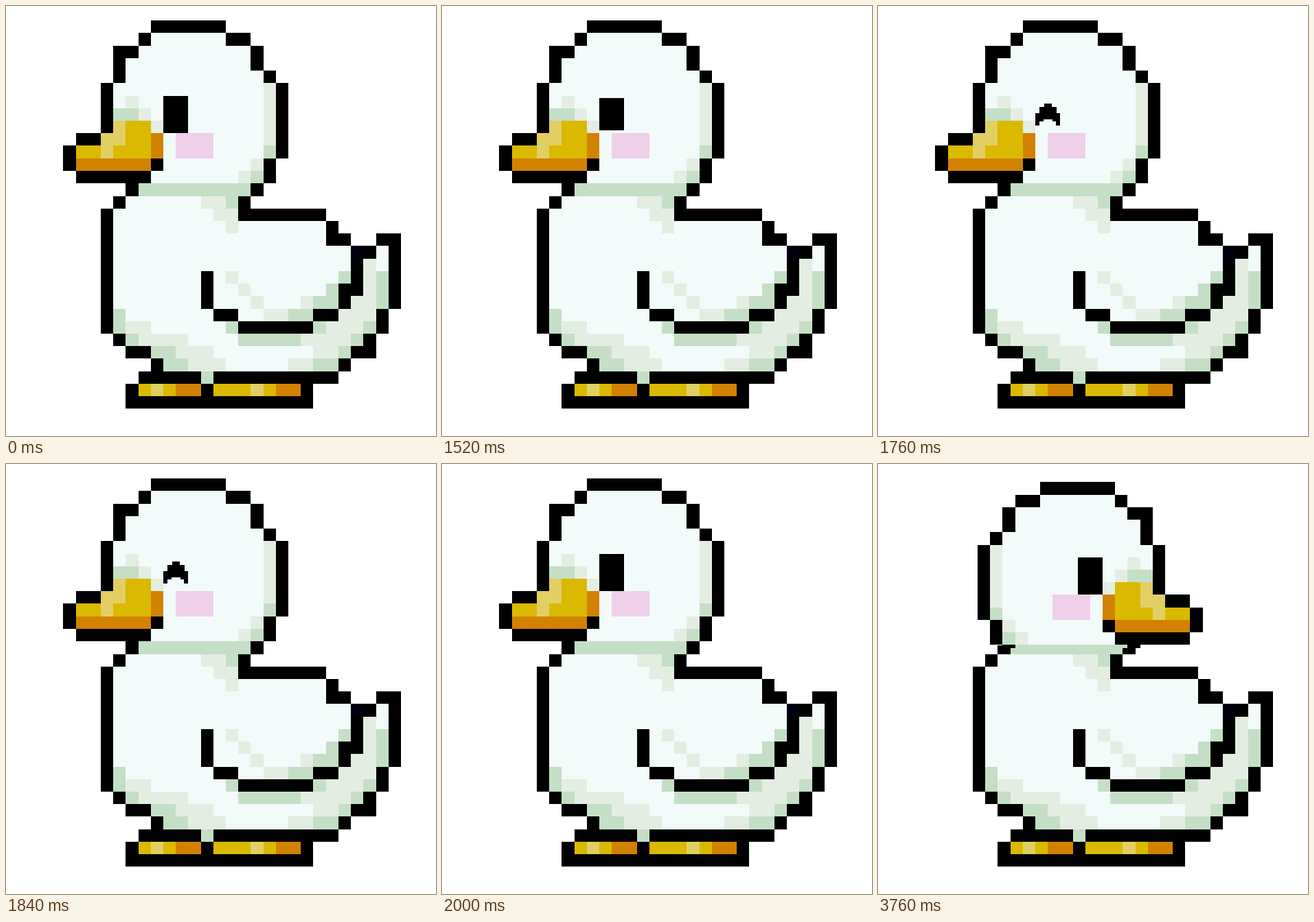
An HTML page that plays this animation: 626 by 626 pixels, repeating every 5.36 s.

```html
<!DOCTYPE html>
<html lang="en">
<head>
<meta charset="utf-8">
<title>Pixel duck</title>
<style>
html, body { margin: 0; width: 100%; height: 100%; overflow: hidden; background: #fff; }
svg { display: block; width: 626px; height: 626px; shape-rendering: crispEdges; }
.white { fill: #f2fafa; }
.light { fill: #e4ede1; }
.green { fill: #c4dfc6; }
.yellow { fill: #dab900; }
.straw { fill: #e1cf63; }
.orange { fill: #d28200; }
.pink { fill: #efcfea; }
</style>
</head>
<body>
<svg viewBox="0 0 626 626">
  <clipPath id="aboveNeck"><path d="M0 0H626V268H0z"/></clipPath>
  <g clip-path="url(#aboveNeck)">
    <g id="head">
      <g transform="translate(83.3 21.2) scale(18.21 18.22)">
        <path d="M7 0H13V1H15V2H16V4H17V5H18V11H17V13H16V14H5V13H1V12H0V10H1V9H3V5H4V2H6V1H7z"/>
        <path class="white" d="M7 1H13V2H15V4H16V5H17V11H16V13H7V12H8V9H4V5H5V3H6V2H7z"/>
        <path class="light" d="M5 6h1v1h-1zM6 7h1v1h-1zM7 8h1v1h-1zM16 5h1v5h-1zM15 11h1v1h-1zM14 12h1v1h-1z"/>
        <path class="green" d="M4 7h2v1h-2zM16 10h1v1h-1zM15 12h1v1h-1zM6 13h9v1h-9z"/>
        <path class="yellow" d="M5 8H7V11H1V10H4V8z"/>
        <path class="straw" d="M4 8H5V10H4V11H3V9H4z"/>
        <path class="orange" d="M1 11H7V12H1zM7 9H8V11H7z"/>
        <path class="pink" d="M9 9h3v2h-3z"/>
      </g>
      <path id="eye"/>
    </g>
  </g>
  <!-- The body overlaps the lower part of the neck. -->
  <g transform="translate(83.3 21.5) scale(18.21 18.22)">
    <path d="M5 13.3H6V13.53H16V14H15V15H21V16H22V17H23V18H25V17H27V23H26V25H25V27H23V28H22V29H20V31H5V29H6V28H7V27H5V26H4V25H3V15H4V14H5z"/>
    <path class="white" d="M5 14H14V16H21V18H23V19H25V18H26V23H25V25H24V26H23V27H22V28H8V27H7V26H5V25H4V15H5z"/>
    <path class="light" d="M11 14H13V15H14V17H13V16H12V15H11zM13 20h1v1h-1zM14 21h1v1h-1zM15 22h1v1h-1zM19 22h1v1h-1zM16 23h2v1h-2z"/>
    <path class="light" d="M24 19H25V24H24V25H23V26H22V27H20V28H18V27H20V26H19V25H21V24H22V23H23V22H24z"/>
    <path class="light" d="M5 24H7V25H10V26H12V27H13V28H10V27H9V26H7V25H5z"/>
    <path class="light" d="M6 25h1v1h-1z"/>
    <path class="green" d="M6 13.53H15V14H6zM13 14h1v1h-1zM22 20h1v1h-1zM21 21h1v2h-2v-1h1zM18 23h2v1h-2zM20 24h1v1h-1zM13 24h1v1h-1zM14 25h5v1h-5z"/>
    <path class="green" d="M25 20H26V23H25zM24 24H25V25H24V26H23V27H22V28H20V27H22V26H23V25H24z"/>
    <path class="green" d="M4 23H5V25H6V26H9V27H10V28H8V27H7V26H5V25H4zM11 28h1v1h-1z"/>
    <path d="M23 19H24V22H23V23H22V21H23zM11 20h1v3h-1zM12 23H14V24H20V23H22V24H20V25H14V24H12z"/>
    <path fill="#000010" d="M23 18h1v1h-1z"/>
    <path class="yellow" d="M6 29h3v1h-3zM12 29h5v1h-5z"/>
    <path class="straw" d="M7 29h1v1h-1zM15 29h1v1h-1z"/>
    <path class="orange" d="M9 29h2v1h-2zM17 29h2v1h-2z"/>
  </g>
</svg>
<script>
const LOOP = 5360, TURN = 3760;
const eyes = {
  open: "M229 131H265V185H229z",
  half: "M229 134H265V181H229z",
  squint: "M234 142H261V149H265V174H257V170H238V174H229V149H234z",
  shut: "M242 142H253V147H260V156H265V174H259V168H254V165H241V168H235V174H229V156H235V147H242z"
};
const blink = [[0, "open"], [1520, "half"], [1600, "squint"], [1760, "shut"], [1920, "squint"], [2000, "open"]];
const head = document.getElementById("head");
const eye = document.getElementById("eye");

function draw(now) {
  const t = now % LOOP;
  const [, pose] = blink.findLast(([start]) => start <= t);
  eye.setAttribute("d", eyes[pose]);
  head.setAttribute("transform", t < TURN ? "" : "translate(556 5.2) scale(-1 1)");
}

const start = performance.now();
function tick() {
  draw(performance.now() - start);
  requestAnimationFrame(tick);
}
tick();
</script>
</body>
</html>
```
